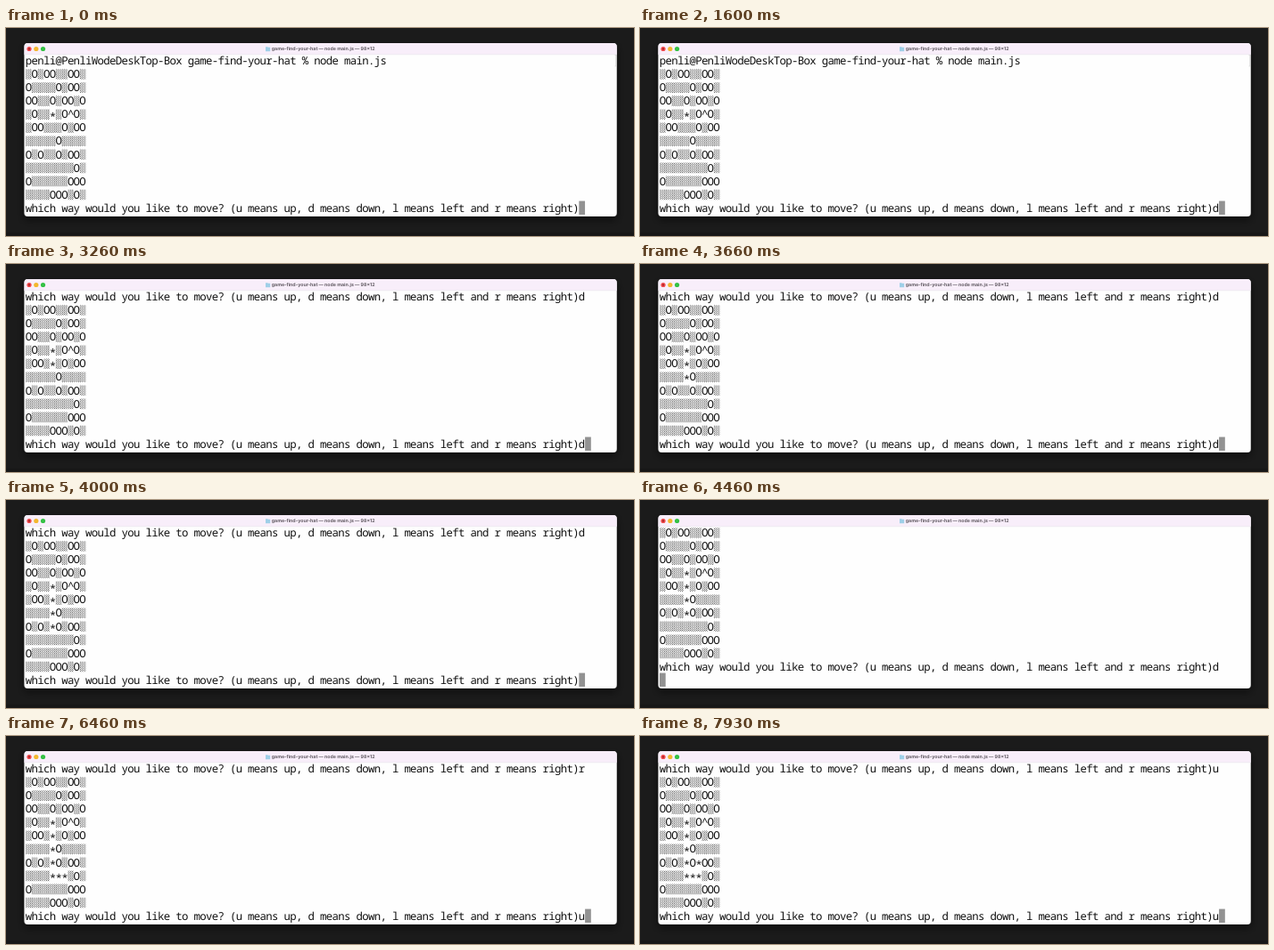
These frames come from a looping animation (704 by 234 pixels, 8000 ms). An HTML page:

```html
<!DOCTYPE html>
<html lang="en">
<head>
<meta charset="utf-8">
<title>Terminal game</title>
<style>
  html, body { margin: 0; width: 100%; height: 100%; overflow: hidden; background: #1b1b1b; }
  svg { display: block; width: 704px; height: 234px; text-rendering: geometricPrecision; }
  #screen text {
    font: 12.3px "Noto Sans Mono", monospace;
    letter-spacing: -0.637px;
    fill: #111;
    white-space: pre;
  }
  #title { font: bold 5.25px Inter, sans-serif; fill: #625b63; }
</style>
</head>
<body>
<svg viewBox="0 0 704 234">
  <defs>
    <filter id="shadow" x="-5%" y="-10%" width="110%" height="125%">
      <feDropShadow dx="0" dy="4" stdDeviation="5" flood-color="#000" flood-opacity=".5"/>
    </filter>
    <clipPath id="frame"><rect x="20.5" y="17" width="664.2" height="195" rx="4"/></clipPath>
    <pattern id="shade" width="2.25" height="2" patternUnits="userSpaceOnUse">
      <path d="M0 0h.8v.8H0zM1.12 1h.8v.8h-.8z" fill="#111"/>
    </pattern>
  </defs>
  <rect width="704" height="234" fill="#1b1b1b"/>
  <rect y="230" width="704" height="4" fill="#171717"/>
  <rect x="20.5" y="17" width="664.2" height="195" rx="4" fill="#fefefe" filter="url(#shadow)"/>
  <rect x="20" y="17" width="666" height="12.7" fill="#f8eefa" clip-path="url(#frame)"/>
  <path d="M20.5 29.7h664.2" stroke="#eae2ec" stroke-width=".6"/>
  <circle cx="26" cy="23.5" r="2.6" fill="#f1484c"/>
  <circle cx="26" cy="23.5" r=".9" fill="#8a1c1c"/>
  <circle cx="33.8" cy="23.5" r="2.6" fill="#f3b72e"/>
  <circle cx="41.5" cy="23.5" r="2.6" fill="#35c145"/>
  <path d="M291 21.2h2.3l.6.6h2.3v4.4H291z" fill="#9fcfe8"/>
  <text id="title" x="355.7" y="25.4" text-anchor="middle">game-find-your-hat — node main.js — 98×12</text>
  <path id="mark" d="M682.6 30.5h1.2v12.5h-1.2" fill="none" stroke="#ccc" stroke-width=".7"/>
  <rect id="cursor" y="194.6" width="6.7" height="15.4" fill="#929292"/>
  <g id="screen"></g>
</svg>
<script>
const LOOP = 8000, ROWS = 12, LEFT = 22, CELL = 6.743, LINE = 15.045, BASELINE = 41.2;
const ECHO = 65; // pause between Enter and the redrawn board
const PROMPT = "penli@PenliWodeDeskTop-Box game-find-your-hat % node main.js";
const QUESTION = "which way would you like to move? (u means up, d means down, l means left and r means right)";
const FIELD = [
  "░O░OO░░OO░",
  "O░░░░O░OO░",
  "OO░░O░OO░O",
  "░O░░*░O^O░",
  "░OO░░░O░OO",
  "░░░░░O░░░░",
  "O░O░░O░OO░",
  "░░░░░░░░O░",
  "O░░░░░░OOO",
  "░░░░OOO░O░"
];
const STEPS = { u: [0, -1], d: [0, 1], l: [-1, 0], r: [1, 0] };

// Each move: key, time typed, time Enter is pressed
const MOVES = [
  ["d", 1600, 2260],
  ["d", 3200, 3400],
  ["d", 3660, 3930],
  ["d", 4260, 4460],
  ["r", 5660, 5795],
  ["r", 6060, 6195],
  ["u", 6460, 7400],
  ["u", 7930, LOOP]
];

function linesAt(time) {
  const board = FIELD.map(row => [...row]);
  const boardLines = () => board.map(row => row.join(""));
  const lines = [PROMPT, ...boardLines(), QUESTION];
  let x = 4, y = 3;
  for (const [key, typed, entered] of MOVES) {
    if (time < typed) break;
    lines[lines.length - 1] += key;
    if (time < entered) break;
    if (time < entered + ECHO) {
      lines.push("");
      break;
    }
    x += STEPS[key][0];
    y += STEPS[key][1];
    board[y][x] = "*";
    lines.push(...boardLines(), QUESTION);
  }
  return lines.slice(-ROWS);
}

const byId = id => document.getElementById(id);

function add(tag, attributes) {
  const node = document.createElementNS("http://www.w3.org/2000/svg", tag);
  for (const name in attributes) node.setAttribute(name, attributes[name]);
  return byId("screen").appendChild(node);
}

const rows = Array.from({ length: ROWS }, (_, i) => {
  const x = LEFT - 0.3, y = BASELINE + i * LINE;
  return {
    y,
    shade: add("path", { fill: "url(#shade)" }),
    text: add("text", { x, y }),
    stars: add("text", { x, y: y + 2.6 }) // lowered to the middle of the line
  };
});

function drawRow(row, line) {
  if (row.line === line) return;
  row.line = line;
  row.text.textContent = line.replace(/[░*]/g, " ");
  row.stars.textContent = line.replace(/[^*]/g, " ");
  row.shade.setAttribute("d", [...line].map((char, i) =>
    char === "░" ? `M${LEFT + i * CELL} ${row.y - 10}h${CELL}v11.6h${-CELL}z` : "").join(""));
}

function draw(time) {
  const lines = linesAt(time);
  rows.forEach((row, i) => drawRow(row, lines[i]));
  byId("cursor").setAttribute("x", LEFT + lines[ROWS - 1].length * CELL);
  byId("mark").setAttribute("opacity", lines[0] === PROMPT ? 1 : 0);
}

const start = performance.now();
function tick() {
  draw((performance.now() - start) % LOOP);
  requestAnimationFrame(tick);
}
tick();
</script>
</body>
</html>
```
